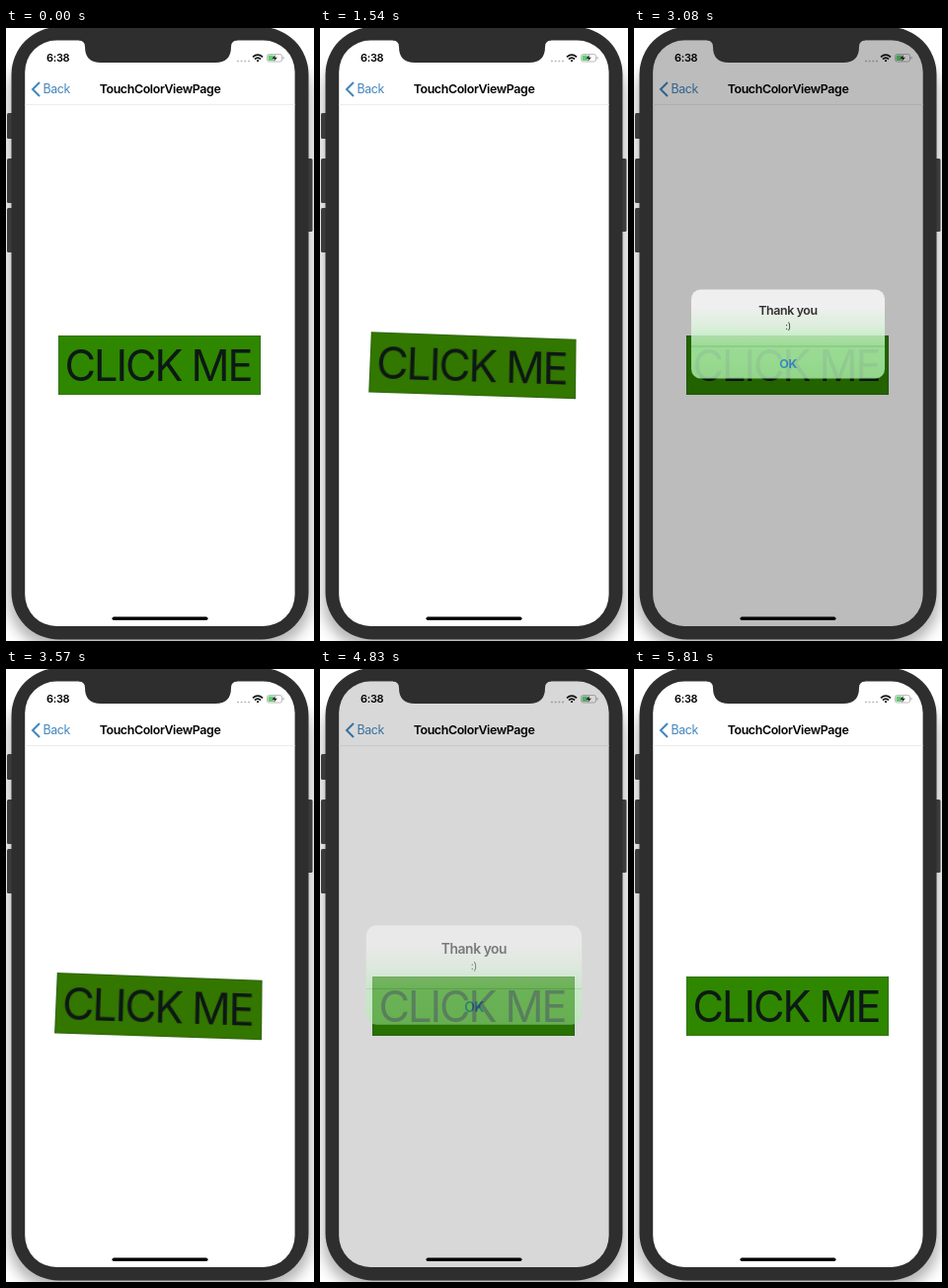
An HTML page for the animation above (6.23 s loop, 312x620 px).

```html
<!DOCTYPE html>
<html lang="en">
<head>
<meta charset="utf-8">
<title>Touch card</title>
<style>
  html, body { margin: 0; width: 100%; height: 100%; overflow: hidden; background: #fff; }
  svg { position: absolute; left: 0; top: 0; display: block; }
  text { font-family: Inter, "Liberation Sans", sans-serif; letter-spacing: -.03em; }
  .mid { text-anchor: middle; }
  .semi { font-weight: 600; }
  #card { transform-origin: 0 0; }
  #card text { letter-spacing: -.047em; }
</style>
</head>
<body>
<svg width="312" height="620">
  <defs>
    <filter id="soft" x="-20%" y="-20%" width="140%" height="140%"><feGaussianBlur stdDeviation="7"/></filter>
  </defs>
  <rect x="3" y="22" width="306" height="604" rx="46" opacity=".3" filter="url(#soft)"/>
  <g fill="#3b3b3b">
    <rect x="1" y="86" width="7" height="26" rx="1.5"/>
    <rect x="1" y="132" width="7" height="45" rx="1.5"/>
    <rect x="1" y="182" width="7" height="45" rx="1.5"/>
    <rect x="304" y="132" width="6.5" height="74" rx="1.5"/>
  </g>
  <rect x="5.5" y="-1" width="301" height="619.5" rx="48" fill="#2e2e2e"/>
  <rect x="19.2" y="12.5" width="273.4" height="592.5" rx="32" fill="#fff"/>
  <path d="M19.2 77.5H292.6" stroke="#ececec"/>

  <text class="semi" x="41" y="34" font-size="11">6:38</text>
  <path d="M234 33.5h13" stroke="#b5b5b5" stroke-width="1.5" stroke-dasharray="1.8 1.9"/>
  <g fill="none" stroke="#111" stroke-width="1.7">
    <path d="M250 29.3q5-4.4 10 0M252 31.5q3-2.6 6 0"/>
    <path d="M254 33.2h2"/>
  </g>
  <rect x="264.500" y="26.500" width="15" height="7.500" rx="2" fill="#fff" stroke="#aaa" stroke-width=".8"/>
  <rect x="265.500" y="27.500" width="6" height="5.500" rx="1" fill="#65c977"/>
  <path d="M281 29v2.500" stroke="#aaa"/>
  <path d="M273 27l-3.500 4h2.500l-.6 2.700 3.500-4h-2.500z" fill="#222"/>

  <path d="M34 55l-7 7 7 7" fill="none" stroke="#4386bd" stroke-width="2"/>
  <text x="37.5" y="66" font-size="12.4" fill="#4386bd">Back</text>
  <text class="mid semi" x="156" y="66" font-size="12.4">TouchColorViewPage</text>
</svg>

<svg id="card" width="205" height="60">
  <rect id="face" width="205" height="60" stroke="#334" stroke-opacity=".45"/>
  <text class="mid" x="101" y="46" font-size="43.2" fill="#080a18" fill-opacity=".88">CLICK ME</text>
</svg>

<svg width="312" height="620">
  <defs>
    <linearGradient id="glass" x2="0" y2="1">
      <stop offset=".2" stop-color="#fafafa"/>
      <stop offset=".42" stop-color="#e2f9e2"/>
      <stop offset=".64" stop-color="#b6f8b6"/>
      <stop offset="1" stop-color="#acf0aa"/>
    </linearGradient>
  </defs>
  <rect id="dim" x="19.2" y="12.5" width="273.4" height="592.5" rx="32"/>
  <g id="alert">
    <rect x="-98" y="-45" width="196" height="90" rx="9.5" fill="url(#glass)"/>
    <text class="mid semi" y="-19.5" font-size="12.4" fill="#111">Thank you</text>
    <text class="mid" y="-5" font-size="9.5" fill="#111">:)</text>
    <path d="M-98 12.5H98" stroke="#000" stroke-opacity=".2" stroke-width=".8"/>
    <text class="mid semi" y="34" font-size="12.4" fill="#3592ec">OK</text>
  </g>
  <path d="M74 11.5V12.5Q80 13 80 19Q80 35 96 35H212Q228 35 228 19Q228 13 234 12.5V11.5Z" fill="#2e2e2e"/>
  <rect x="107.5" y="595.5" width="97" height="3.5" rx="1.75"/>
</svg>

<script>
const LOOP = 6230, STEP = 70, W = 205, H = 60;
const $ = id => document.getElementById(id);
const card = $('card'), face = $('face'), dim = $('dim'), alertBox = $('alert');

const presses = [
  { start: 490, peak: 1050, end: 1610 },
  { start: 3500, peak: 4035, end: 4690 }
];
const alerts = [
  { show: 2030, start: 2030, close: 2870 },
  { show: 4830, start: 4608, close: 5320 }
];

// Corners clockwise from top left
const flat = [[53, 311], [258, 311], [258, 371], [53, 371]];
const tilted = [[43.5, 280.8], [270.5, 340.2], [266.3, 404.3], [22.8, 351.2]];

const clamp = v => Math.min(1, Math.max(0, v));
const ramp = (t, from, to) => clamp((t - from) / (to - from));
const mix = (a, b, p) => a.map((v, i) => v + (b[i] - v) * p);

function pressAmount(t) {
  return Math.max(...presses.map(({ start, peak, end }) =>
    Math.min(ramp(t, start, peak), 1 - ramp(t, peak, end))));
}

// Green to red, shown with slightly mixed primaries in linear light
function tint(p) {
  const r = p ** 2.2, g = ((1 - p) / 2) ** 2.2;
  const channels = [r + .11 * g, .04 * r + 1.14 * g, 0];
  return `rgb(${channels.map(v => Math.round(255 * clamp(v) ** (1 / 2.2)))})`;
}

// Perspective matrix that maps the card onto four corners
function quadMatrix([[x0, y0], [x1, y1], [x2, y2], [x3, y3]]) {
  const ax = x1 - x2, ay = y1 - y2, bx = x3 - x2, by = y3 - y2;
  const sx = x0 - x1 + x2 - x3, sy = y0 - y1 + y2 - y3;
  const det = ax * by - bx * ay;
  const g = (sx * by - bx * sy) / det, h = (ax * sy - sx * ay) / det;
  const m = [
    (x1 - x0 + g * x1) / W, (y1 - y0 + g * y1) / W, 0, g / W,
    (x3 - x0 + h * x3) / H, (y3 - y0 + h * y3) / H, 0, h / H,
    0, 0, 1, 0,
    x0, y0, 0, 1
  ];
  return `matrix3d(${m.map(v => v.toFixed(7))})`;
}

function drawCard(t) {
  const p = pressAmount(t);
  card.style.transform = quadMatrix(flat.map((c, i) => mix(c, tilted[i], p)));
  face.setAttribute('fill', tint(p));
}

function drawAlert(t) {
  const a = alerts.find(({ show, close }) => t >= show && t < close + 490);
  const shown = a ? 1 - (1 - ramp(t, a.start, a.start + 630)) ** 1.5 : 0;
  const left = a ? 1 - ramp(t, a.close, a.close + 490) ** 2 : 0;
  const scale = 1 + .22 * (1 - shown);
  dim.setAttribute('opacity', .32 * shown * left);
  alertBox.setAttribute('opacity', shown * left);
  alertBox.setAttribute('transform', `translate(156 309.5) scale(${scale})`);
}

function frame() {
  const t = Math.floor(performance.now() % LOOP / STEP) * STEP;
  drawCard(t);
  drawAlert(t);
  requestAnimationFrame(frame);
}
frame();
</script>
</body>
</html>
```
